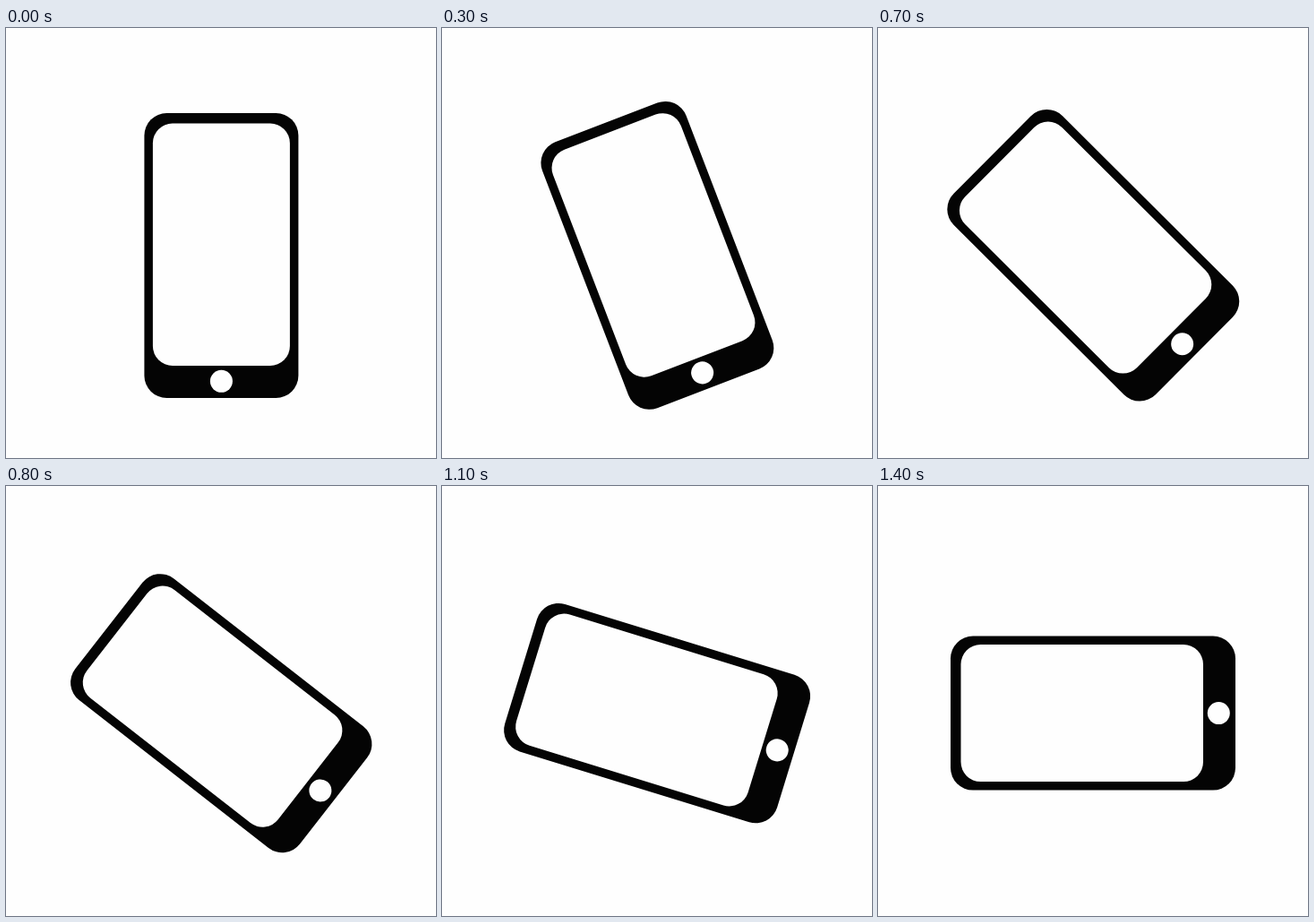
Recreate the animation shown at these times as an HTML page with a canvas. Size 480 by 480 pixels, loop 1500 ms.

```html
<!DOCTYPE html>
<html lang="en">
<head>
<meta charset="utf-8">
<title>Rotating phone</title>
<style>
  html, body { margin: 0; width: 100%; height: 100%; overflow: hidden; background: #fefefe; }
  canvas { display: block; }
</style>
</head>
<body>
<canvas id="stage" width="480" height="480"></canvas>
<script>
const ctx = document.getElementById('stage').getContext('2d');
const LOOP = 1500, STEP = 100;
const PAPER = '#fefefe', INK = '#040404';

// Two nearly even sweeps, each ending in a short step.
function angleAt(step) {
  return step <= 5 ? Math.min(7 * step, 31.2) : Math.min(31.2 + 6.95 * (step - 5), 90);
}

function roundedBox(x, y, w, h, r, color) {
  ctx.fillStyle = color;
  ctx.beginPath();
  ctx.roundRect(x, y, w, h, r);
  ctx.fill();
}

function drawPhone(degrees) {
  ctx.save();
  ctx.translate(240, 254);
  ctx.rotate(-degrees * Math.PI / 180);
  ctx.translate(0.4, 0);
  roundedBox(-86, -159, 172, 318, 25, INK);
  roundedBox(-76.5, -147.5, 153, 270.5, 22, PAPER);
  ctx.fillStyle = PAPER;
  ctx.beginPath();
  ctx.arc(0, 140.3, 12.5, 0, Math.PI * 2);
  ctx.fill();
  ctx.restore();
}

const start = performance.now();
function render() {
  const time = (performance.now() - start) % LOOP;
  ctx.fillStyle = PAPER;
  ctx.fillRect(0, 0, 480, 480);
  drawPhone(angleAt(Math.floor(time / STEP)));
  requestAnimationFrame(render);
}
render();
</script>
</body>
</html>
```
